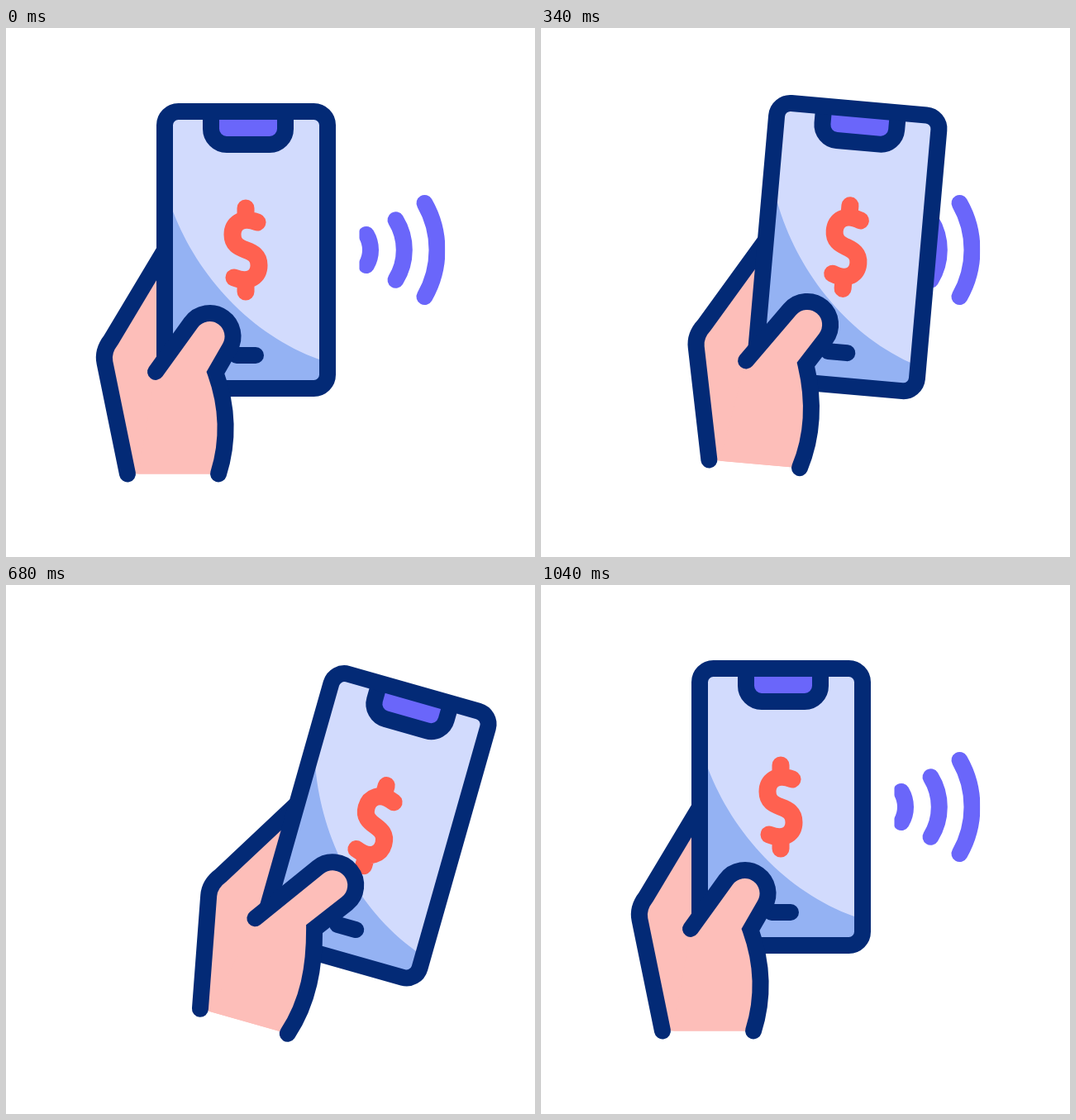
These frames come from a looping animation (640x640 px, 1.8 s). An HTML page with a canvas:

```html
<!DOCTYPE html>
<html lang="en">
<head>
<meta charset="utf-8">
<title>Contactless payment</title>
<style>
  html, body { margin: 0; width: 100%; height: 100%; overflow: hidden; background: #fff; }
  canvas { display: block; width: 640px; height: 640px; }
</style>
</head>
<body>
<canvas id="stage" width="640" height="640"></canvas>
<script>
const ctx = document.getElementById('stage').getContext('2d');
const LOOP = 1800, STEP = 20;
const NAVY = '#032a76', SCREEN = '#d2dbfd', SHADE = '#94b2f3';
const PURPLE = '#6a66fa', RED = '#ff6150', SKIN = '#fdbeb9';
const WRIST = { x: 202, y: 540 };

// Outlines in the resting pose
const palmBack = new Path2D('M190.5 271.5 L127 377.5 Q116.500 391 119.500 405 L147 539.500 H257 L253 417 L215 300 Z');
const backLine = new Path2D('M190.5 271.5 L127 377.5 Q116.500 391 119.500 405 L147 539.500');
const shade = new Path2D('M192 190 L202 222 C232 300 296 371 379 401 L389 401 V436 H192 Z');
const notch = new Path2D('M248 105 V122 A19 19 0 0 0 267 141 H319 A19 19 0 0 0 338 122 V105');
const homeBar = new Path2D('M279 396 H302');
const dollar = new Path2D('M304 235 C284 227 274 238 274 250 C274 262 282 265.500 290 268.500 ' +
  'C298 271.500 306 275 306 287 C306 299 296 310 276 302 M290 218 V229 M290 308 V319');

const body = new Path2D();
body.roundRect(192, 101, 197, 335, 16.5);

// Direction from a circle's centre to where a line from (x, y) touches it
function touch(cx, cy, r, x, y, side) {
  return Math.atan2(y - cy, x - cx) + side * Math.acos(r / Math.hypot(x - cx, y - cy));
}

// The tip slides along the thumb and pulls the crease at its root with it
function thumbPath(reach) {
  const x = 246.5 + reach * 0.55, y = 373 - reach * 0.835, r = 28;
  const rootX = 181, rootY = 416, creaseX = 253.5, creaseY = 417 - reach * 0.33;
  const path = new Path2D();
  path.moveTo(rootX, rootY);
  path.arc(x, y, r, touch(x, y, r, rootX, rootY, 1), touch(x, y, r, creaseX, creaseY, -1));
  path.lineTo(creaseX, creaseY);
  path.bezierCurveTo(266, 452, 271, 495, 257, 539.5);
  return path;
}

function stroke(path, color = NAVY, width = 20, join = 'round') {
  ctx.strokeStyle = color;
  ctx.lineWidth = width;
  ctx.lineJoin = join;
  ctx.lineCap = 'round';
  ctx.stroke(path);
}

function fill(path, color) {
  ctx.fillStyle = color;
  ctx.fill(path);
}

const clamp = v => Math.min(1, Math.max(0, v));
const smooth = p => p * p * (3 - 2 * p);
const surge = power => p => p ** power / (p ** power + (1 - p) ** power);

// Segments: [start, end, target value, easing]
function track(t, value, segments) {
  for (const [start, end, target, ease] of segments) {
    value += (target - value) * ease(clamp((t - start) / (end - start)));
  }
  return value;
}

function pose(t) {
  const slide = (rest, left, right) => track(t, rest, [
    [0, 90, left, smooth],
    [90, 490, right, smooth],
    [575, 1040, rest, surge(2)]
  ]);
  return {
    x: slide(WRIST.x, 178.5, 295),
    y: slide(WRIST.y, 529, 527.3),
    angle: track(t, 0, [
      [0, 95, -5.5, smooth],
      [132, 572, 17.4, smooth],
      [572, 990, 0, surge(2.2)]
    ]),
    reach: track(t, 0, [
      [0, 95, -9, smooth],
      [110, 585, 27, smooth],
      [585, 1040, 0, surge(2)]
    ])
  };
}

function wave(x, half, sag) {
  const r = (half * half + sag * sag) / (2 * sag);
  const a = Math.asin(half / r);
  const arc = new Path2D();
  arc.arc(x + sag - r, 268.5, r, -a, a);
  stroke(arc, PURPLE);
}

function drawWaves() {
  ctx.save();
  ctx.beginPath();
  ctx.rect(427.5, 190, 103.7, 160);
  ctx.clip();
  wave(436, 18.5, 5);
  wave(471.5, 36.3, 10.3);
  wave(506.5, 56.5, 15);
  ctx.restore();
}

function drawPhone() {
  fill(body, SCREEN);
  ctx.save();
  ctx.clip(body);
  fill(shade, SHADE);
  ctx.restore();
  fill(notch, PURPLE);
  stroke(notch);
  stroke(body);
  stroke(homeBar);
  stroke(dollar, RED, 21);
}

function drawThumb(reach) {
  const thumb = thumbPath(reach);
  const palm = new Path2D(thumb);
  palm.lineTo(160, 539.5);
  palm.closePath();
  fill(palm, SKIN);
  stroke(thumb, NAVY, 20, 'miter');
}

function draw(t) {
  ctx.fillStyle = '#fff';
  ctx.fillRect(0, 0, 640, 640);
  drawWaves();
  const { x, y, angle, reach } = pose(t);
  ctx.save();
  ctx.translate(x, y);
  ctx.rotate(angle * Math.PI / 180);
  ctx.translate(-WRIST.x, -WRIST.y);
  fill(palmBack, SKIN);
  stroke(backLine);
  drawPhone();
  drawThumb(reach);
  ctx.restore();
}

function tick() {
  const t = performance.now() % LOOP;
  draw(Math.floor((t + 0.01) / STEP) * STEP);
  requestAnimationFrame(tick);
}
tick();
</script>
</body>
</html>
```
